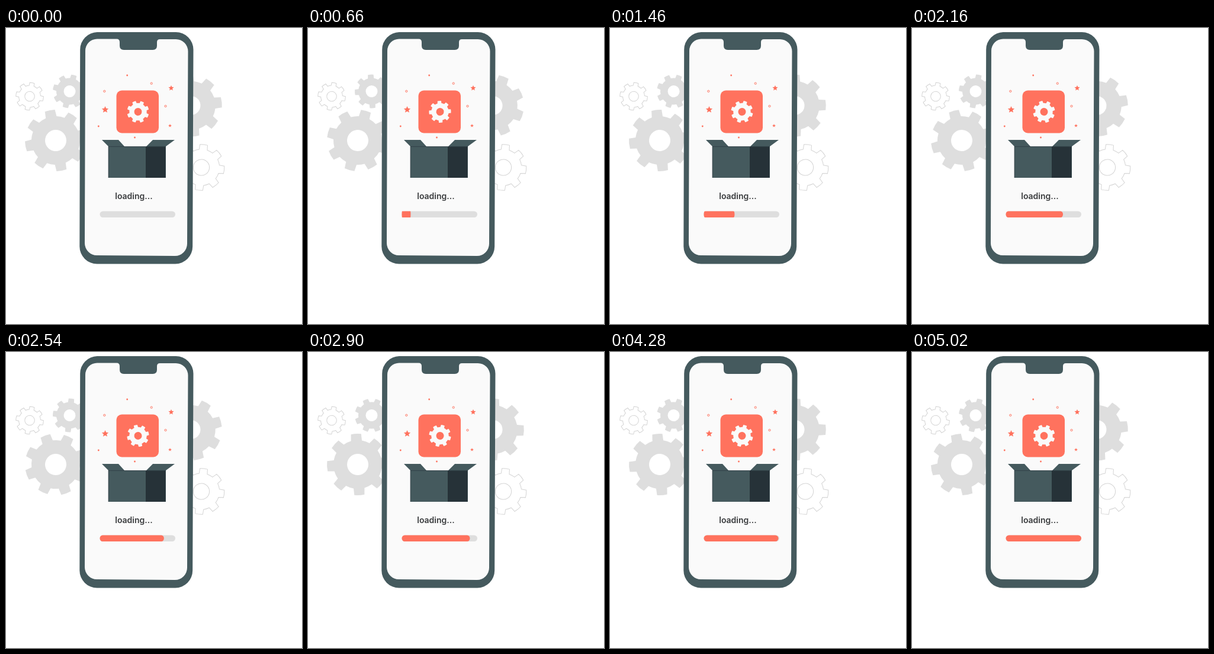
An HTML page for the animation above (5.04 s loop, 500 by 500 pixels).

```html
<!DOCTYPE html>
<html lang="en">
<head>
<meta charset="utf-8">
<title>Loading</title>
<style>
  html, body { margin: 0; width: 100%; height: 100%; overflow: hidden; background: #fff; }
  svg { display: block; width: 500px; height: 500px; }
  text { font: 600 14px Inter, Roboto, sans-serif; fill: #3a3c3e; text-anchor: middle; }
</style>
</head>
<body>
<svg viewBox="0 0 500 500">
  <g id="gears"></g>

  <path fill="#455a5e" d="M154 7H287A29.500 29.500 0 0 1 316.500 36.500L315.200 369A29.500 29.500 0 0 1 286 398.500H154A29.500 29.500 0 0 1 124.300 369L125.200 36.500A29.500 29.500 0 0 1 154 7Z"/>
  <path fill="#fafafa" d="M154 18.500H187Q192 18.500 192 24V30Q192 37 199 37H248Q255 37 255 30V24Q255 19 260 19H287A20.500 20.500 0 0 1 307.500 39.500L306 364.500A20.500 20.500 0 0 1 285.500 385L153.500 384A20.500 20.500 0 0 1 133 363.500L134 38.500A20 20 0 0 1 154 18.500Z"/>

  <rect x="186.500" y="105.500" width="71.500" height="72" rx="9" fill="#ff725e"/>
  <g id="icon"></g>
  <g id="sparks" fill="#ff725e"></g>

  <path fill="#455a5e" d="M162 189H190L200 200H237L248 189H285L270 200V253H173V200Z"/>
  <path fill="#263238" d="M236 200.500H269.500V253H236Z"/>
  <path fill="none" stroke="#263238" stroke-width=".6" d="M173 200.300H270M173 200V253"/>

  <text x="216" y="289">loading...</text>
  <rect x="158.500" y="309.500" width="127.500" height="10.500" rx="5.200" fill="#dedede"/>
  <g transform="translate(158.500 309.500)">
    <rect id="fill" width="127.500" height="10.500" rx="5.200" fill="#ff725e"/>
  </g>
</svg>
<script>
const LOOP = 5040;
const SPIN = 540;
const $ = id => document.getElementById(id);

function add(parent, tag, attrs) {
  const el = document.createElementNS("http://www.w3.org/2000/svg", tag);
  for (const key in attrs) el.setAttribute(key, attrs[key]);
  parent.append(el);
  return el;
}

const polar = (r, deg) => {
  const a = deg * Math.PI / 180;
  return (r * Math.cos(a)).toFixed(2) + " " + (r * Math.sin(a)).toFixed(2);
};

// Eight trapezoid teeth around a ring with a round hole
function gearPath(r, hole) {
  const root = r * .79;
  let d = "";
  for (let a = 0; a < 360; a += 45) {
    d += (a ? "L" : "M") + polar(root, a - 13) + "L" + polar(r, a - 9.5) +
      `A${r} ${r} 0 0 1 ` + polar(r, a + 9.5) + "L" + polar(root, a + 13) +
      `A${root} ${root} 0 0 1 ` + polar(root, a + 32);
  }
  return d + `ZM${hole} 0A${hole} ${hole} 0 1 0 ${-hole} 0A${hole} ${hole} 0 1 0 ${hole} 0Z`;
}

function gear(parent, x, y, r, hole, phase, turn, look) {
  const el = add(parent, "path", { d: gearPath(r, hole), "fill-rule": "evenodd", ...look });
  return p => el.setAttribute("transform", `translate(${x} ${y}) rotate(${phase + turn * p})`);
}

const gray = { fill: "#dedede" };
const line = { fill: "#fff", stroke: "#d4d4d4", "stroke-width": 1 };
const gears = [
  gear($("gears"), 40, 115.5, 23.3, 8.3, 10, 0, line),
  gear($("gears"), 330, 235.5, 38.8, 13.6, 6, 0, line),
  gear($("gears"), 107.5, 107, 28.5, 10, 15, -SPIN, gray),
  gear($("gears"), 84, 190, 52, 18, 34, -SPIN, gray),
  gear($("gears"), 312.5, 131, 52.3, 16, 39, -SPIN, gray),
  gear($("icon"), 223, 141.5, 18.6, 6.5, 23, SPIN, { fill: "#fafafa" })
];

function star(x, y, r) {
  const points = [];
  for (let i = 0; i < 10; i++) points.push(polar(i % 2 ? r * .45 : r, i * 36 - 90));
  add($("sparks"), "polygon", { points: points.join(" "), transform: `translate(${x} ${y})` });
}
star(167.5, 138, 6);
star(279, 101.5, 4.8);
star(277, 165, 3);
for (const [cx, cy] of [[204.7, 80], [156.3, 166], [217.5, 185]])
  add($("sparks"), "circle", { cx, cy, r: 1.4 });
for (const [cx, cy] of [[166.3, 106.8], [245.7, 93.6], [269.5, 132]])
  add($("sparks"), "circle", { cx, cy, r: 1.6, fill: "none", stroke: "#ff725e" });

// Shared easing: time in ms and progress, joined by a smooth curve
const keys = [[0, 0], [660, .117], [1460, .407], [2160, .757], [2900, .902], [3580, .961], [LOOP, 1]];
function slope(i) {
  if (!i) return .00012;
  if (i === keys.length - 1) return 0;
  const a = keys[i - 1], b = keys[i + 1];
  return (b[1] - a[1]) / (b[0] - a[0]);
}
function progress(t) {
  let i = 0;
  while (i < keys.length - 2 && t >= keys[i + 1][0]) i++;
  const [t0, v0] = keys[i], [t1, v1] = keys[i + 1];
  const h = t1 - t0, s = (t - t0) / h, q = 1 - s;
  return v0 * q * q * (1 + 2 * s) + v1 * s * s * (3 - 2 * s) +
    h * s * q * (slope(i) * q - slope(i + 1) * s);
}

function draw(now) {
  const p = progress(now % LOOP);
  for (const spin of gears) spin(p);
  $("fill").setAttribute("transform", `scale(${p} 1)`);
}

const start = performance.now();
function tick() {
  draw(performance.now() - start);
  requestAnimationFrame(tick);
}
tick();
</script>
</body>
</html>
```
